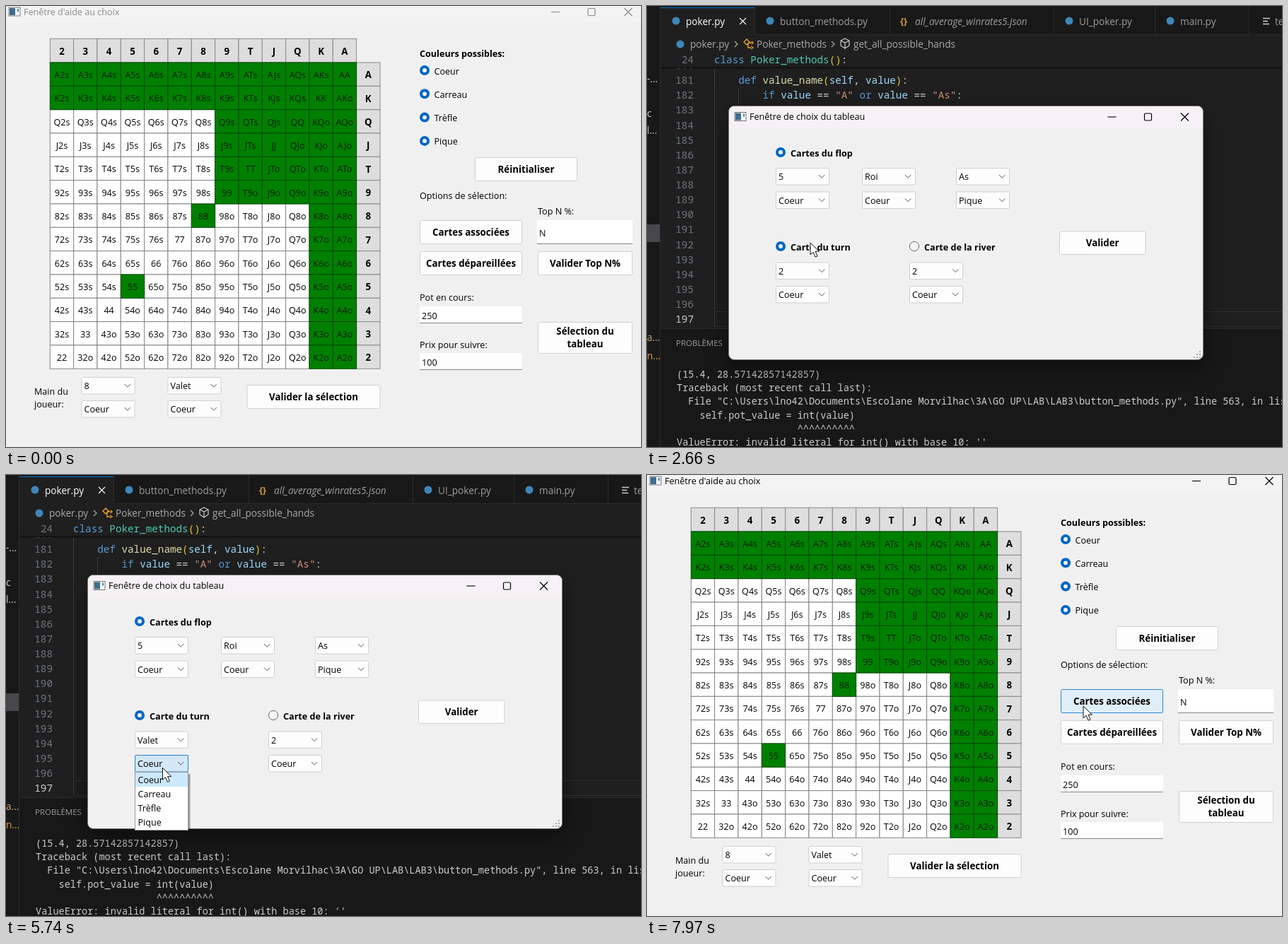
These frames come from a looping animation (898 px wide and 624 px high, 8 s). An HTML page:

```html
<!DOCTYPE html>
<html lang="fr">
<head>
<meta charset="utf-8">
<title>Choix du tableau</title>
<style>
html, body { margin: 0; width: 100%; height: 100%; overflow: hidden; background: #181818; }
#stage { display: block; width: 100vw; height: 100vh; }
text { font-family: "Open Sans", "Noto Sans", sans-serif; white-space: pre; }
text.m { font-family: "Noto Sans Mono", "DejaVu Sans Mono", monospace; }
.b { font-weight: 700; }
.i { font-style: italic; }
.c { text-anchor: middle; }
.e { text-anchor: end; }
#panel { filter: drop-shadow(0 12px 16px rgba(0,0,0,.45)); }
</style>
</head>
<body>
<svg id="stage" viewBox="0 0 898 624" preserveAspectRatio="none"></svg>
<script>
const LOOP = 8000, BLUE = '#0067c0';

// ---- drawing helpers: text is placed by its vertical centre ----
const txt = (x, y, s, cls = '', fill = '#000', size = 12.6) =>
  `<text x="${x}" y="${y + size * .36}" class="${cls}" fill="${fill}" font-size="${size}">${s}</text>`;
const rect = (x, y, w, h, fill, more = '') =>
  `<rect x="${x}" y="${y}" width="${w}" height="${h}" fill="${fill}" ${more}/>`;
const line = (d, stroke, w = 1) => `<path d="${d}" fill="none" stroke="${stroke}" stroke-width="${w}"/>`;
const dot = (x, y, r, fill, more = '') => `<circle cx="${x}" cy="${y}" r="${r}" fill="${fill}" ${more}/>`;

const button = (x, y, w, h, label, id = '') => {
  const rows = label.split('|');
  return rect(x + .5, y + .5, w - 1, h - 1, '#fdfdfd', `rx="2" stroke="#d0d0d0" id="${id}"`) +
    rows.map((s, i) => txt(x + w / 2, y + h / 2 + (i - (rows.length - 1) / 2) * 18, s, 'b c', '#000', 13.3)).join('');
};
const combo = (x, y, label, id = '') =>
  rect(x + .5, y + .5, 75, 23.5, '#fdfdfd', `rx="1.5" stroke="#cfcfcf" id="${id}"`) +
  `<g id="${id}Text">${txt(x + 4, y + 12.5, label)}</g>` +
  line(`M${x + 61} ${y + 10}l4.2 4.2 4.2-4.2`, '#555');
const field = (x, y, w, h, label) =>
  rect(x, y, w, h, '#fff') + line(`M${x} ${y + h - .5}h${w}`, '#868686') + txt(x + 3, y + h / 2 + 1, label);
const radioOn = (x, y) => dot(x, y, 7, BLUE) + dot(x, y, 2.9, '#fff');
const radioOff = (x, y) => dot(x, y, 6.6, '#f5f5f5', 'stroke="#666"');

const titleBar = (x, y, closeX, label) =>
  rect(x, y - 6, 16, 12, '#fafafa', 'stroke="#777"') + rect(x + 1, y - 5, 8, 10, '#3f6d8c') +
  rect(x + 12, y - 4, 2, 4, '#4a7fa5') +
  txt(x + 21, y, label, '', 'currentColor') +
  line(`M${closeX - 109} ${y + .5}h12`, 'currentColor', 1.1) +
  rect(closeX - 57, y - 4.5, 10, 10, 'none', 'rx="1.5" stroke="currentColor" stroke-width="1.2"') +
  line(`M${closeX - 5.5} ${y - 5}l11 11m0-11l-11 11`, 'currentColor', 1.2);
const grip = (x, y) => [0, 4, 8].map(a => [0, 4, 8].map(b =>
  a + b < 9 ? rect(x - a, y - b, 2, 2, '#aaa') : '').join('')).join('');

// ---- editor behind the windows ----
const KEYS = /^(class|def|if|elif|else|or|return)$/;
const paint = s => s.replace(/"[^"]*"|\w+|[()\[\]]/g, (w, at) => {
  const color = w[0] === '"' ? '#ce9178' : /[()\[\]]/.test(w) ? '#e8c61c' : KEYS.test(w) ? '#569cd6' :
    /^(int|Poker_methods)$/.test(w) ? '#4ec9b0' : /^\d/.test(w) ? '#b5cea8' :
    s[at + w.length] === '(' ? '#dcdcaa' : '#9cdcfe';
  return `<tspan fill="${color}">${w}</tspan>`;
});
const code = (y, n, s) =>
  txt(66, y, n, 'm e', n === 197 ? '#ccc' : '#6e7681', 14.27) + txt(95, y, paint(s), 'm', '#d4d4d4', 14.27);

function editor() {
  const cases = [['"A"', '"As"', 14], ['"K"', '"Roi"', 13], ['"Q"', '"Dame"', 12], ['"J"', '"Valet"', 11], ['"T"', '', 10]];
  const src = ['', '    def value_name(self, value):'];
  cases.forEach(([a, b, n], i) => src.push(
    `        ${i ? 'elif' : 'if'} value == ${a}${b && ' or value == ' + b}:`, `            return(${n})`));
  src.push('        else:', '            return(int(value))', '',
    '    def get_all_possible_hands(self):', '        all_possible_hands = []', '        list_card_names = []');

  let s = rect(0, 0, 898, 624, '#181818') + rect(19, 40, 879, 417, '#1f1f1f') + rect(19, 2, 133, 39, '#1f1f1f');
  s += line('M95.5 88V453M129.5 116V390M129.5 412V453', '#3c3c3c') + line('M95 432.5H898M95 453.5H898', '#303030');
  src.forEach((row, i) => s += code(83.9 + i * 21.125, 180 + i, row));
  s += rect(19, 41, 879, 46, '#1f1f1f') + line('M19 87.5H898', '#101010', 2) + code(76, 24, 'class Poker_methods():');
  s += line('M18.5 0V624M152.5 0V40M343.5 0V40M575.5 0V40M718.5 0V40M851.5 0V40M152 40.5H898M19 456.5H898', '#2b2b2b');
  s += line('M19 2.5H152', '#0078d4');

  [[55, 'poker.py', '#fff'], [188, 'button_methods.py'], [611, 'UI_poker.py'], [754, 'main.py']].forEach(([x, name, c]) =>
    s += dot(x - 14, 21, 5.5, '#3f86b8') + txt(x, 22, name, '', c || '#9d9d9d', 13.6));
  s += line('M131 17l9 9m0-9l-9 9', '#eee', 1.3);
  s += txt(358, 21, '{}', 'b', '#d19a3c', 13) + txt(379, 22, 'all_average_winrates5.json', 'i', '#9d9d9d', 13.6);
  s += line('M871 17.5h10M871 21.5h7M871 25.5h9', '#ccc', 1.4) + txt(888, 22, 'te', '', '#9d9d9d', 13.6);

  const crumb = '#a9a9a9';
  s += dot(47, 54, 5.5, '#3f86b8') + txt(61, 54, 'poker.py', '', crumb, 13.6) + txt(155, 54, 'Poker_methods', '', crumb, 13.6) +
    txt(292, 54, 'get_all_possible_hands', '', crumb, 13.6) + line('M124 50l4 4-4 4M261 50l4 4-4 4', crumb, 1.2);
  s += line('M137 51l4-4 4 4-4 4zM143 52h5M143 52v7h4M148 50l2 2-2 2M147 57l3 2-3 2', '#ee9d28', 1.4);
  s += line('M280 46l6 3v7l-6 4-6-4v-7zM274 49l6 3 6-3M280 52v8', '#ccc', 1.2);

  s += rect(0, 309, 18, 25, '#47474c');
  [[103, '-...', '#ccc'], [152, 'c', '#ccc'], [176, 'l...', '#ccc'], [469, 'a...', '#c8a27a'], [495, 'n...', '#e2a03f']]
    .forEach(([y, t, c]) => s += txt(0, y, t, '', c, 13.6));

  [[41, 'PROBLÈMES'], [167, 'SORTIE'], [232, 'CONSOLE DE DÉBOGAGE'], [396, 'TERMINAL'], [479, 'PORTS']]
    .forEach(([x, t]) => s += txt(x, 477, t, '', '#9d9d9d', 11.5));
  s += dot(131, 476, 10, '#4d4d4d') + txt(131, 476, '54', 'c', '#fff', 11);
  ['(15.4, 28.57142857142857)', 'Traceback (most recent call last):',
    '  File "C:\\Users\\lno42\\Documents\\Escolane Morvilhac\\3A\\GO UP\\LAB\\LAB3\\button_methods.py", line 563, in listen',
    '    self.pot_value = int(value)', ' '.repeat(21) + '^'.repeat(10),
    "ValueError: invalid literal for int() with base 10: ''"
  ].forEach((t, i) => s += txt(42, 521 + i * 19.25, t, 'm', '#ccc', 13.55));
  return s;
}

// ---- main window ----
function handGrid() {
  const ranks = '23456789TJQKA', P = 33.33, N = 13;
  let s = '';
  const cell = (x, y, label, fill, edge, cls, size, ink) =>
    s += rect(x, y, P, P, fill, `stroke="${edge}"`) + txt(x + P / 2, y + P / 2 + .8, label, cls, ink, size);
  for (let k = 0; k < N; k++) {
    cell(62.3 + k * P, 46.3, ranks[k], '#dedede', '#8a8a8a', 'b c', 13.3, '#000');
    cell(495.6, 80 + k * P, ranks[N - 1 - k], '#dedede', '#8a8a8a', 'b c', 13.3, '#000');
  }
  const picks = [];
  for (let i = 0; i < N; i++) for (let c = 0; c < N; c++) {
    const r = N - 1 - i, hi = Math.max(r, c), lo = Math.min(r, c);
    const on = hi > 10 || lo > 6 || (r === c && (r === 6 || r === 3));
    const label = ranks[hi] + ranks[lo] + (r > c ? 's' : r < c ? 'o' : '');
    const add = () => cell(62.3 + c * P, 80 + i * P, label, on ? '#008000' : '#fff', on ? '#004a00' : '#858585', 'c', 12.6, on ? '#001c00' : '#000');
    on ? picks.push(add) : add();
  }
  picks.forEach(add => add());
  return s;
}

function mainWindow() {
  let s = rect(-5, -6, 911, 655, '#f0f0f0', 'rx="8" stroke="#999"') + rect(-4.5, -5.5, 910, 29.5, '#f4f3f4', 'rx="7"');
  s += `<g id="bar">${titleBar(4, 8, 880, "Fenêtre d'aide au choix")}</g>` + handGrid();
  s += txt(585, 67.5, 'Couleurs possibles:', 'b');
  ['Coeur', 'Carreau', 'Trèfle', 'Pique'].forEach((t, i) =>
    s += radioOn(592, 91 + i * 33.3) + txt(605.5, 92 + i * 33.3, t));
  s += button(663, 214, 145, 34, 'Réinitialiser') + txt(585, 268, 'Options de sélection:') + txt(752, 290, 'Top N %:') +
    button(585, 303, 145, 34, 'Cartes associées', 'paired') + field(751, 303, 135, 34, 'N') +
    button(585, 347, 145, 34, 'Cartes dépareillées') + button(752, 347, 134, 34, 'Valider Top N%') +
    txt(585, 412, 'Pot en cours:') + field(585, 425, 145, 24, '250') +
    txt(585, 479, 'Prix pour suivre:') + field(585, 491, 145, 24, '100') +
    button(752, 447, 134, 45, 'Sélection du|tableau', 'board');
  s += txt(40, 545.5, 'Main du') + txt(40, 563.5, 'joueur:') + combo(106.5, 525, '8') + combo(106.5, 558, 'Coeur') +
    combo(228.5, 525, 'Valet') + combo(228.5, 558, 'Coeur') + button(340.5, 536, 189, 34, 'Valider la sélection');
  return s + grip(899, 642);
}

// ---- board dialog ----
function dialog() {
  let s = rect(115.5, 141.5, 671, 359, '#f0f0f0', 'rx="8" stroke="#777"') +
    `<path d="M116 173V149a7 7 0 0 1 7-7H779a7 7 0 0 1 7 7v24z" fill="#f6f1f4"/>`;
  s += titleBar(124, 156.5, 760.5, 'Fenêtre de choix du tableau');
  s += radioOn(189, 207) + txt(203, 208, 'Cartes du flop', 'b');
  [[182, '5', 'Coeur'], [304, 'Roi', 'Coeur'], [437, 'As', 'Pique']].forEach(([x, a, b]) =>
    s += combo(x, 229, a) + combo(x, 262.5, b));
  s += `<g id="turnOff">${radioOff(189, 340)}</g><g id="turnOn">${radioOn(189, 340)}</g>` + txt(203, 341, 'Carte du turn', 'b') +
    radioOff(378, 340) + txt(392, 341, 'Carte de la river', 'b');
  s += combo(182, 362.5, '2', 'rank') + combo(182, 396, 'Coeur', 'suit') + combo(371, 362.5, '2') + combo(371, 396, 'Coeur');
  return s + button(583, 318.5, 122.5, 33.5, 'Valider', 'ok') + grip(781, 496);
}

const dropdown = (id, y, h, items, scroll) =>
  `<svg id="${id}" x="182" y="${y}" width="80" height="${h}">` +
  rect(4, 3, 74.5, h - 3, 'rgba(0,0,0,.35)') + rect(.5, .5, 75, h - 1, '#fff', 'stroke="#9a9a9a"') +
  rect(1, 1, scroll ? 54.5 : 74, 20, '#cce8ff', `id="${id}Row"`) +
  (scroll ? rect(56, 1, 19, h - 2, '#f3f3f3') + rect(61.5, 19, 8.5, 125, '#868686') : '') +
  items.map((t, i) => txt(4.5, 11 + i * 20, t)).join('') + '</svg>';

const stage = document.getElementById('stage');
stage.innerHTML = editor() +
  `<g id="main">${mainWindow()}</g><g id="panel">${dialog()}</g>` +
  dropdown('ranks', 386, 202, [2, 3, 4, 5, 6, 7, 8, 9, 10, 'Valet'], true) +
  dropdown('suits', 420, 83, ['Coeur', 'Carreau', 'Trèfle', 'Pique'], false) +
  dot(0, 0, 14, '#e3e13c', 'id="halo" opacity=".82"') +
  '<path id="cursor" d="M0 0V17l4-3.8 3 6.9 3-1.3-3-6.6h5.4z" fill="#fff" stroke="#111"/>';
const $ = id => document.getElementById(id);

// ---- motion ----
const clamp = v => Math.max(0, Math.min(1, v));
const ramp = (t, from, dur) => clamp((t - from) / dur);
const within = (t, a, b) => t >= a && t < b;
const show = (el, on) => el.style.display = on ? '' : 'none';

const PATH = [
  [0, 828, 640], [810, 806, 503], [1060, 797, 465], [1670, 797, 465], [2070, 231, 354], [2270, 231, 354],
  [2330, 231, 335], [2760, 231, 335], [3050, 226, 375], [3360, 226, 375], [4110, 224, 497], [4420, 220, 582],
  [4640, 220, 582], [4650, 219, 579], [4890, 219, 579], [5290, 222, 408], [5600, 222, 408], [6390, 216, 484],
  [6420, 216, 485], [6830, 216, 485], [7420, 617, 327], [8000, 617, 327]
];
const CLICKS = [1180, 2510, 3080, 4800, 5330, 6650, 7460];

function pointer(t) {
  const i = Math.max(1, PATH.findIndex(k => k[0] > t));
  const [t0, x0, y0] = PATH[i - 1], [t1, x1, y1] = PATH[i];
  const p = ramp(t, t0, t1 - t0), e = p * p * (3 - 2 * p);
  return [x0 + (x1 - x0) * e, y0 + (y1 - y0) * e];
}

function tint(id, fill, edge = '#cfcfcf', w = 1) {
  const el = $(id);
  el.setAttribute('fill', fill || '#fdfdfd');
  el.setAttribute('stroke', fill ? edge : '#cfcfcf');
  el.setAttribute('stroke-width', w);
}
function place(id, opacity, s, cx, cy) {
  const el = $(id);
  show(el, opacity > 0);
  el.setAttribute('opacity', opacity);
  el.setAttribute('transform', `translate(${cx * (1 - s)} ${cy * (1 - s)}) scale(${s})`);
}
function unroll(id, t, open, close, height, y, cy) {
  const el = $(id), p = ramp(t, open, 160);
  show(el, p > 0 && t < close);
  el.setAttribute('height', height * p);
  const rows = Math.floor(height / 20);
  const row = Math.max(0, Math.min(rows - 1, Math.floor((cy - y) / 20)));
  $(id + 'Row').setAttribute('y', 1 + row * 20);
}

function render(t) {
  const [x, y] = pointer(t);
  show($('cursor'), t >= 30);
  $('cursor').setAttribute('transform', `translate(${x} ${y})`);
  show($('halo'), CLICKS.some(c => within(t, c, c + 90)));
  $('halo').setAttribute('transform', `translate(${x} ${y})`);

  if (t < 4000) {
    const p = ramp(t, 1500, 140);
    place('main', 1 - p, 1 - .08 * p, 450, 320);
  } else {
    const p = ramp(t, 7700, 200);
    place('main', clamp(p * 1.27), .816 + .184 * p * (2 - p), 380, 286);
  }
  $('bar').style.color = t < 1180 ? '#8c8c8c' : '#000';
  const overBoard = y < 492 && t < 1670;
  tint('board', (overBoard || within(t, 7600, 7850)) && '#e0eef9', '#2a7fc9', within(t, 1180, 1700) ? 2 : 1);
  tint('paired', t >= 7880 && '#e0eef9', '#2a86d1');

  const inP = ramp(t, 1670, 200), outP = ramp(t, 7690, 150);
  const ease = inP * (2 - inP);
  place('panel', inP * (1 - outP), (.9 + .1 * ease) * (1 - .025 * outP), 450, 320);
  show($('turnOn'), t >= 2560);
  show($('turnOff'), t < 2560);

  const pressed = '#cce4f7', edge = '#2a7fc9';
  const overRank = y > 362 && y < 386 && x < 258, overSuit = y > 396 && y < 420 && x < 258;
  tint('rank', within(t, 3080, 4960) ? pressed : overRank && '#e0eef9', edge);
  tint('suit', within(t, 5330, 6860) ? '#d3e7f7' : t > 4900 && overSuit && '#e0eef9', edge);
  const overOk = t > 7000 && x > 583 && y < 352;
  tint('ok', overOk && (t >= 7460 ? '#bcdcf4' : '#e0eef9'), edge);
  $('rankText').firstChild.textContent = t < 4870 ? '2' : 'Valet';
  $('suitText').firstChild.textContent = t < 6740 ? 'Coeur' : 'Pique';
  unroll('ranks', t, 3170, 4870, 202, 387, y);
  unroll('suits', t, 5400, 6740, 83, 421, y);
}

const start = performance.now();
function tick() {
  render((performance.now() - start) % LOOP);
  requestAnimationFrame(tick);
}
render(0);
requestAnimationFrame(tick);
</script>
</body>
</html>
```
